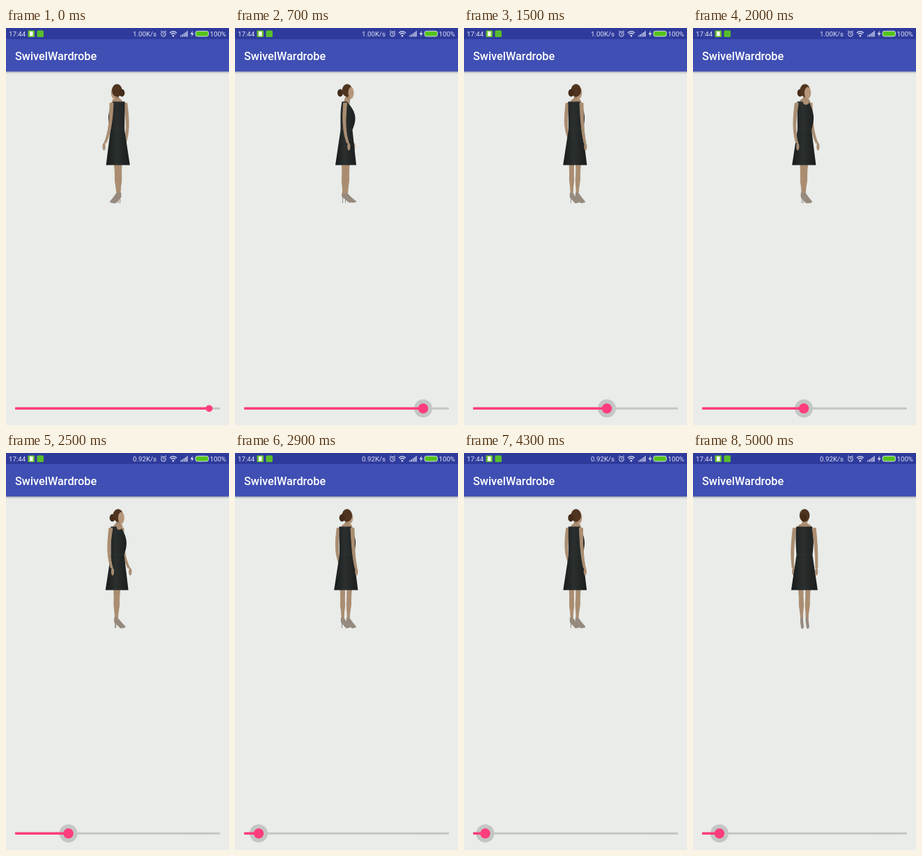
Recreate the animation shown at these times as an HTML page. Size 320 by 569 pixels, loop 5.1 s.

```html
<!DOCTYPE html>
<html lang="en">
<head>
<meta charset="utf-8">
<title>SwivelWardrobe</title>
<style>
html, body { margin: 0; width: 100%; height: 100%; overflow: hidden; background: #e9ece9; }
svg { display: block; width: 100%; height: 100%; }
text { font-family: Roboto, sans-serif; }
.status { font-size: 9.7px; fill: #dfe2f3; }
</style>
</head>
<body>
<svg viewBox="0 0 320 569">
  <defs>
    <linearGradient id="cloth">
      <stop offset="0" stop-color="#171b1b"/>
      <stop offset=".45" stop-color="#2b302f"/>
      <stop offset="1" stop-color="#191d1d"/>
    </linearGradient>
    <linearGradient id="shade" x2="0" y2="1">
      <stop offset="0" stop-color="#000" stop-opacity=".24"/>
      <stop offset="1" stop-color="#000" stop-opacity="0"/>
    </linearGradient>
  </defs>
  <rect width="320" height="569" fill="#e9ece9"/>
  <rect y="62" width="320" height="4" fill="url(#shade)"/>
  <rect width="320" height="62.4" fill="#3f4fb4"/>
  <rect width="320" height="16" fill="#2f3b9c"/>
  <text x="13" y="46" font-size="16.3" font-weight="500" fill="#fff">SwivelWardrobe</text>

  <text class="status" x="4" y="12">17:44</text>
  <rect x="31.5" y="3.5" width="9.5" height="9.5" rx="1" fill="#69c32f"/>
  <rect x="34" y="5" width="4.5" height="6.5" fill="#fff"/>
  <rect x="44.5" y="3.5" width="9.5" height="9.5" rx="1.5" fill="#58bd2c"/>
  <text class="status" id="speed" x="216" y="12" text-anchor="end"></text>
  <g fill="none" stroke="#dfe2f3">
    <circle cx="226" cy="8.7" r="3.4"/>
    <path d="M226 6.6V9H227.6M222 5.4L224 3.7M230 5.4L228 3.7" stroke-width=".9"/>
    <path d="M235 7Q240 2.6 245 7M236.8 9Q240 6 243.2 9" stroke-width="1.2"/>
    <path d="M251 12.5V10.5M253.3 12.5V9M255.6 12.5V7.5M257.9 12.5V6M260 12.5V4.2" stroke-width="1.3"/>
    <rect x="272" y="4.4" width="18.5" height="7.6" rx="2.6" stroke-width=".9" fill="#55c41c"/>
  </g>
  <circle cx="240" cy="11.2" r="1.3" fill="#dfe2f3"/>
  <path d="M268 3.8L264.6 9H267L266 12.8L269.6 7.4H267.2Z" fill="#dfe2f3"/>
  <text class="status" x="292.5" y="12">100%</text>

  <g id="model" stroke-linejoin="round" stroke-linecap="round"></g>

  <g transform="translate(0 545.3)">
    <circle id="halo" r="13" fill="#c3c6c4"/>
    <rect x="13" y="-1.5" width="294" height="3" rx="1" fill="#c4c6c4"/>
    <rect id="fill" x="13" y="-1.7" height="3.4" rx="1" fill="#ff3d7c"/>
    <circle id="thumb" fill="#ff3d7c"/>
  </g>
</svg>
<script>
const $ = id => document.getElementById(id);
const LOOP = 5100, STEP = 100, CX = 160;
const SKIN = '#aa8d71', FACE = '#b5967a', HAIR = '#4f3520', BUN = '#442b19', SHOE = '#968a7e';

// Drag turning points; angle 0 faces the viewer, 90 faces right
const DRAG = [
  { t: 0, x: 291.5, angle: 225 },
  { t: 700, x: 270, angle: 90 },
  { t: 1500, x: 205, angle: -225 },
  { t: 2000, x: 159, angle: -315 },
  { t: 2900, x: 34, angle: -945 },
  { t: 3300, x: 15, angle: -1040 },
  { t: 3600, x: 23, angle: -990 },
  { t: LOOP, x: 39, angle: -900 }
];

const mix = (a, b, k) => a + (b - a) * k;
const range = (n, fn) => Array.from({ length: n + 1 }, (_, i) => fn(i / n));

function sample(t) {
  const i = DRAG.findIndex(p => p.t > t), a = DRAG[i - 1], b = DRAG[i];
  const k = (t - a.t) / (b.t - a.t);
  return { x: mix(a.x, b.x, k), angle: mix(a.angle, b.angle, k) };
}

// Body sections: half width w, half depth d, forward offset f
function bodice(k) {
  const bust = Math.sin(Math.PI * k);
  return { y: 146 - 40.5 * k, w: 11.5 + 1.2 * bust, d: 8.5 + 2.5 * bust - 5 * k ** 3, f: 2.6 * bust - 3 * k * k };
}
const skirt = k => ({ y: 146 + 50.5 * k, w: 11.5 + 7.5 * k, d: 8.5 + 6.5 * k, f: -k });
const shoulders = k => ({ y: 101 + 11 * k, w: 3.5 + 10.5 * Math.sqrt(k), d: 4 + k, f: 1.5 - 2.5 * k });

function drawModel(deg) {
  const s = Math.sin(deg * Math.PI / 180), c = Math.cos(deg * Math.PI / 180);
  const px = (l, f) => CX + l * c + f * s;
  const depth = (l, f) => f * c - l * s;
  const span = (a, b) => Math.hypot(a * c, b * s);
  const n = v => v.toFixed(2);
  const poly = (pts, fill, line = 0) =>
    `<polygon points="${pts.map(p => p.map(n)).join(' ')}" fill="${fill}" stroke="${fill}" stroke-width="${n(line)}"/>`;
  const oval = (x, y, rx, ry, fill) =>
    `<ellipse cx="${n(x)}" cy="${y}" rx="${n(rx)}" ry="${ry}" fill="${fill}"/>`;

  // Outline of a column of { x, y, r } slices
  const column = (list, fill, line) => poly([
    ...list.map(p => [p.x - p.r, p.y]),
    ...list.map(p => [p.x + p.r, p.y]).reverse()
  ], fill, line);
  const solid = (sections, fill) =>
    column(sections.map(p => ({ x: px(0, p.f), y: p.y, r: span(p.w, p.d) })), fill);

  const arm = (side, reach) => {
    const bend = k => px(side * (14 + 3.5 * Math.sin(2 * k)), -2 - 4 * k + (reach + 5) * k ** 3);
    return [depth(side * 15, 0),
      column(range(10, k => ({ x: bend(k), y: 108 + 57 * k, r: 2.5 - 1.1 * k })), SKIN, 1) +
      oval(bend(1.06), 170, 2.1, 5.5, SKIN)];
  };

  const leg = (side, f) => {
    const shape = k => ({
      x: px(side * (5 - 1.5 * k), f - k), y: 190 + 51 * k,
      r: 3.5 - 2.2 * k + .8 * Math.exp(-(((k - .55) / .15) ** 2))
    });
    const at = (d, y) => [px(side * 3.7, f + d), y];
    const [heel] = at(-2.5, 0);
    const shoe = [at(-3, 237), at(1, 238), at(6, 243), at(13, 249), at(7, 250), at(-3, 242)];
    return [depth(side * 4, f),
      column(range(12, shape), SKIN, 1) +
      `<path d="M${n(heel)} 239V250.5" stroke="${SHOE}"/>` +
      poly(shoe, SHOE, 1 + 2.4 * Math.abs(c))];
  };

  const stack = parts => parts.sort((a, b) => a[0] - b[0]).map(p => p[1]).join('');

  const neck = column(range(3, k => ({ x: px(0, 3 - 3 * k), y: 96 + 11 * k, r: 3 + .6 * k })), '#9c8066', 1);
  const neckline = c > 0 ? oval(px(0, 3), 106, 6.5 * c, 4, SKIN) : '';
  const waist = span(11.5, 8.5);
  const seam = `<path d="M${n(CX - waist)} 145q${n(waist)} 1.6 ${n(2 * waist)} 0" fill="none" stroke="#343a38" stroke-width=".5"/>`;
  const trunk = neck + solid(range(6, shoulders), SKIN) +
    solid([...range(12, bodice).reverse(), skirt(1)], 'url(#cloth)') + seam + neckline;

  const head = stack([
    [0, oval(px(0, 1), 89.5, 7.3, 9.3, HAIR)],
    [7 * c, oval(px(0, 6.5), 93, span(5.3, 4), 8.6, FACE)],
    [-9 * c, oval(px(0, -9), 93, 4, 5.4, BUN)]
  ]);

  return stack([leg(1, -3), leg(-1, 1)]) + stack([[0, trunk], arm(1, 9), arm(-1, 3)]) + head;
}

let last = -1;
function render(ms) {
  const t = Math.floor(ms % LOOP / STEP) * STEP;
  if (t === last) return;
  last = t;
  const { x, angle } = sample(t), held = t > STEP;
  $('model').innerHTML = drawModel(angle);
  $('speed').textContent = t < 2400 ? '1.00K/s' : '0.92K/s';
  $('fill').setAttribute('width', x - 13);
  $('thumb').setAttribute('cx', x);
  $('thumb').setAttribute('r', held ? 7.2 : 4.9);
  $('halo').setAttribute('cx', x);
  $('halo').setAttribute('visibility', held ? 'visible' : 'hidden');
}

const start = performance.now();
function tick() {
  render(performance.now() - start);
  requestAnimationFrame(tick);
}
tick();
</script>
</body>
</html>
```
